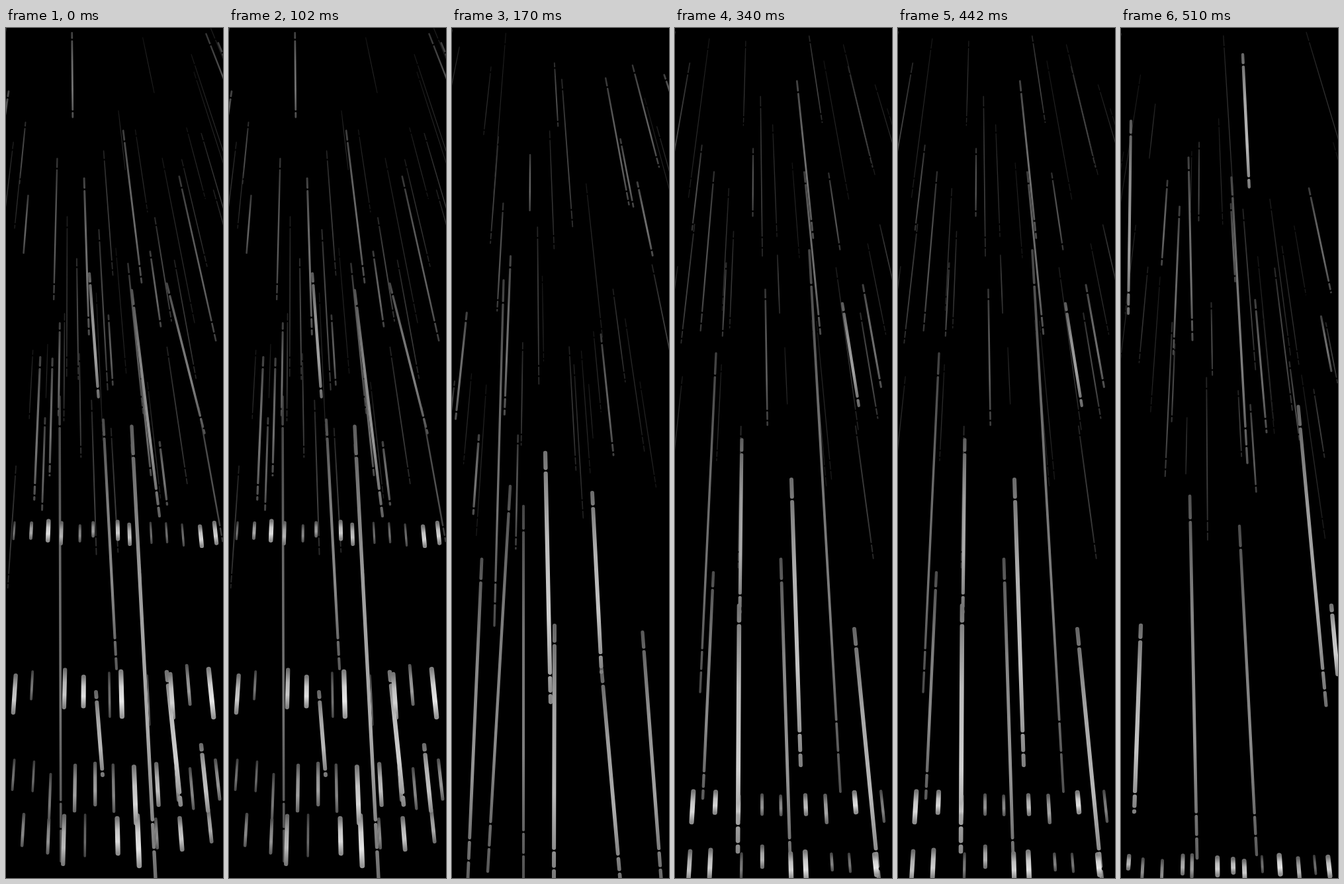
Animation of 328x1280 px, one loop 0.68 s. Source, as an HTML page with a canvas:

```html
<!DOCTYPE html>
<html lang="en">
<head>
<meta charset="utf-8">
<title>Rain</title>
<style>
html, body { margin: 0; width: 100%; height: 100%; overflow: hidden; background: #000; }
canvas {
  position: absolute; left: 0; top: 0; width: 100%; height: 100%;
  visibility: hidden; animation: flash 680ms step-end infinite;
}
@keyframes flash { 0% { visibility: visible; } 25%, 100% { visibility: hidden; } }
</style>
</head>
<body>
<script>
const W = 328, H = 1280, STEP = 170;

// main streaks per scene, brightest first: x1, y1, x2, y2
const streaks = [
  [
    [243,970,264,1170], [295,1080,306,1185], [136,1000,146,1125],
    [190,600,226,1280], [126,370,140,560], [190,395,232,735],
    [147,590,167,965], [243,385,300,610], [81,555,83,1255]
  ],
  [
    [141,640,149,1015], [212,700,226,970], [155,900,154,1280],
    [226,965,254,1280], [288,910,316,1280], [45,800,24,1280],
    [88,690,54,1270], [108,720,108,1280], [78,380,64,900]
  ],
  [
    [97,870,95,1240], [176,680,190,1110], [271,905,308,1280],
    [101,620,98,880], [253,415,278,570], [160,800,175,1280],
    [58,820,42,1160], [203,335,250,1150], [62,490,38,1000]
  ],
  [
    [318,870,328,980], [30,900,20,1180], [184,40,194,245],
    [268,570,310,1020], [15,140,11,430], [104,705,115,1250],
    [179,750,205,1245], [167,225,191,655], [102,195,108,470]
  ]
];

// rows of splashes: top, height, count
const splashes = [
  [[742, 32, 13], [960, 75, 10], [1100, 85, 11], [1175, 75, 9]],
  [],
  [[1145, 48, 9], [1232, 46, 9]],
  [[1245, 34, 13]]
];

function seeded(seed) {
  return () => (seed = (seed * 16807) % 2147483647) / 2147483647;
}

function line(g, x1, y1, x2, y2, level) {
  const len = Math.hypot(x2 - x1, y2 - y1);
  const w = (level * .82 + .2) * (.7 + .35 * (y1 + y2) / 2 / H);
  const tone = Math.min(240, level * 26);
  const grad = g.createLinearGradient(x1, y1, x2, y2);
  [.55, .9, 1, .65].forEach((k, n) => {
    const v = Math.round(tone * k);
    grad.addColorStop(n / 3, `rgb(${v},${v},${v})`);
  });
  g.strokeStyle = grad;
  g.lineWidth = w;
  // both ends of long streaks break into beads
  const gap = w + 2;
  g.setLineDash(len > 90 ? [len * .06, gap, len * .8, gap, len * .05, gap, len] : []);
  g.beginPath();
  g.moveTo(x1, y1);
  g.lineTo(x2, y2);
  g.stroke();
}

// thin distant rain, fanned out from a point above the stage
function mist(g, rnd, count, depth, axis) {
  for (let n = 0; n < count; n++) {
    const x = (n * .618 % 1) * W;
    const y = rnd() * depth;
    const h = 80 + rnd() * 170;
    line(g, x, y, x + (x - axis) * h / (y + 520), y + h, 1.5 + rnd() ** 2 * 3);
  }
}

function splash(g, rnd, [top, height, count]) {
  for (let n = 0; n < count; n++) {
    const x = (n + .2 + rnd() * .6) * W / count;
    const y = top + rnd() * height * .3;
    const h = height * (.5 + rnd() * .5);
    line(g, x, y, x + (x - 130) * h / 1700, y + h, 4 + rnd() * 5);
  }
}

streaks.forEach((rows, i) => {
  const c = document.createElement('canvas');
  c.width = W;
  c.height = H;
  c.style.animationDelay = `${i && (i - streaks.length) * STEP}ms`;
  const g = c.getContext('2d');
  const rnd = seeded(91 + i * 577);
  g.fillRect(0, 0, W, H);
  g.lineCap = 'round';
  g.globalCompositeOperation = 'lighten';
  g.filter = 'blur(0.7px)';
  mist(g, rnd, i ? 38 : 52, i ? 620 : 700, i ? 122 : 95);
  rows.forEach((r, n) => line(g, ...r, 8 - n * .45));
  splashes[i].forEach(s => splash(g, rnd, s));
  document.body.append(c);
});
</script>
</body>
</html>
```
